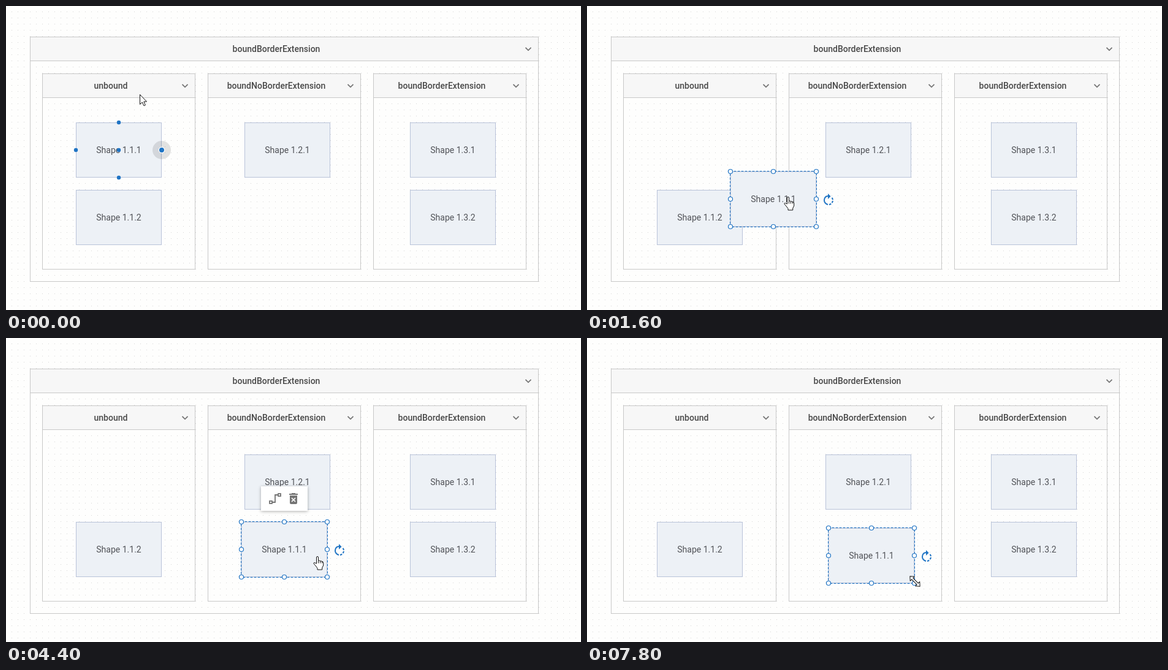
These frames come from a looping animation (938 by 496 pixels, 8000 ms). An HTML page with a canvas:

```html
<!DOCTYPE html>
<html lang="en">
<head>
<meta charset="utf-8">
<title>Container binding</title>
<style>
  html, body { margin: 0; width: 100%; height: 100%; overflow: hidden; background: #fefefd; }
  canvas { display: block; }
</style>
</head>
<body>
<canvas id="stage" width="938" height="496"></canvas>
<script>
const ctx = document.getElementById('stage').getContext('2d');
const W = 938, H = 496, LOOP = 8000, STEP = 200, GRID = 10;
const BLUE = '#1f74c4', GRAY = '#757575', INK = '#111';

// Pointer stops as [time, x, y]; the dragged shape follows from them.
const pointer = [
  [0, 218, 144], [800, 212, 236], [1600, 327, 311], [2400, 392, 436],
  [2800, 424, 337], [3400, 482, 346], [4400, 507, 356], [5200, 523, 373],
  [6800, 573, 303], [7400, 543, 436], [7600, 533, 383], [7800, 535, 397]
];
const drags = [
  { from: 800, to: 3400, grip: [98, 46], maxY: H },
  { from: 5200, to: 7600, grip: [139, 73], maxY: 340 }
];
const columns = ['unbound', 'boundNoBorderExtension', 'boundBorderExtension'];
const fixedShapes = ['1.1.2', '1.2.1', '1.3.1', '1.3.2'];

const clamp = (v, lo, hi) => Math.max(lo, Math.min(hi, v));
const ease = p => p * p * (3 - 2 * p);
const snap = (v, origin) => origin + GRID * Math.round((v - origin) / GRID);
const columnX = i => 59 + 270 * i;

function pointerAt(t) {
  const i = clamp(pointer.findIndex(k => k[0] > t), 0, pointer.length);
  const b = pointer[i] && i ? pointer[i] : pointer[pointer.length - 1];
  const a = i ? pointer[i - 1] : b;
  const p = a === b ? 0 : ease((t - a[0]) / (b[0] - a[0]));
  return [a[1] + (b[1] - a[1]) * p, a[2] + (b[2] - a[2]) * p];
}

function shapeAt(t) {
  const { from, to, grip, maxY } = drags[t < drags[1].from ? 0 : 1];
  const [px, py] = pointerAt(clamp(t, from, to));
  return [snap(px - grip[0], 4), Math.min(snap(py - grip[1], 0), maxY)];
}

function fill(color, x, y, w, h) {
  ctx.fillStyle = color;
  ctx.fillRect(x, y, w, h);
}

function frame(color, x, y, w, h) {
  ctx.strokeStyle = color;
  ctx.lineWidth = 1;
  ctx.strokeRect(x + 0.5, y + 0.5, w - 1, h - 1);
}

function disc(color, x, y, r, edge) {
  ctx.beginPath();
  ctx.arc(x, y, r, 0, Math.PI * 2);
  ctx.fillStyle = color;
  ctx.fill();
  if (!edge) return;
  ctx.strokeStyle = edge;
  ctx.lineWidth = 1.2;
  ctx.stroke();
}

function line(points, color, width) {
  ctx.beginPath();
  points.forEach(p => ctx.lineTo(...p));
  ctx.strokeStyle = color;
  ctx.lineWidth = width;
  ctx.stroke();
}

function label(text, x, y, weight, color) {
  ctx.font = weight + ' 14px Roboto, sans-serif';
  ctx.textAlign = 'center';
  ctx.fillStyle = color;
  ctx.fillText(text, x, y);
}

function drawDots() {
  for (let y = 9; y < H; y += GRID)
    for (let x = 9; x < W; x += GRID) fill('rgba(0,0,0,0.16)', x, y, 1, 1);
}

function drawContainer(title, x, y, w, h) {
  fill('#f7f7f7', x, y, w, 40);
  frame('#c8c8c8', x, y, w, h);
  fill('#c8c8c8', x, y + 39, w, 1);
  label(title, x + (w - 26) / 2, y + 25, 500, '#484848');
  const cx = x + w - 17, cy = y + 20;
  line([[cx - 4.5, cy - 2.2], [cx, cy + 2.3], [cx + 4.5, cy - 2.2]], GRAY, 1.8);
}

function drawShape(id, x, y) {
  fill('#edf1f6', x, y, 140, 90);
  frame('#b9c3d9', x, y, 140, 90);
  label('Shape ' + id, x + 70, y + 50, 400, '#505257');
}

// The last two digits of an id give its column and row.
function drawFixedShape(id) {
  const [, col, row] = id.split('.').map(Number);
  drawShape(id, columnX(col - 1) + (col === 1 ? 55 : 60), 80 + 110 * row);
}

function drawPorts(x, y) {
  for (const [dx, dy] of [[70, 0], [0, 45], [70, 45], [70, 90]])
    disc(BLUE, x + dx, y + dy, 3.2);
  disc('rgba(0,0,0,0.11)', x + 140, y + 45, 15);
  disc(BLUE, x + 140, y + 45, 4.6, '#fff');
}

function drawRotateIcon(x, y) {
  ctx.strokeStyle = ctx.fillStyle = BLUE;
  ctx.lineWidth = 2;
  for (const [a, b] of [[98, 262], [-37, -8], [8, 37], [53, 82]]) {
    ctx.beginPath();
    ctx.arc(x, y, 7, a * Math.PI / 180, b * Math.PI / 180);
    ctx.stroke();
  }
  ctx.fill(new Path2D(`M${x - 1} ${y - 11}l4.5 4.5l-4.5 4.5Z`));
}

function drawSelection(x, y) {
  ctx.setLineDash([4, 2]);
  frame(BLUE, x - 1, y - 1, 142, 92);
  ctx.setLineDash([]);
  for (const dx of [0, 70, 140])
    for (const dy of [0, 45, 90])
      if (dx !== 70 || dy !== 45) disc('#fff', x + dx, y + dy, 3.5, BLUE);
  drawRotateIcon(x + 160, y + 47);
}

function drawToolbar(x, y) {
  ctx.save();
  ctx.translate(x, y);
  ctx.shadowColor = 'rgba(0,0,0,0.32)';
  ctx.shadowBlur = 5;
  ctx.shadowOffsetY = 1;
  fill('#fff', 0, 0, 76, 40);
  ctx.shadowColor = 'transparent';
  // Connector
  line([[18, 26], [23, 26], [23, 14], [28, 14]], GRAY, 1.8);
  ctx.strokeRect(14, 24, 4, 4);
  ctx.strokeRect(28, 12, 4, 4);
  // Trash can
  fill(GRAY, 50, 11, 6, 2);
  fill(GRAY, 46, 12, 14, 2);
  ctx.beginPath();
  ctx.roundRect(47, 15, 12, 14, [0, 0, 2, 2]);
  ctx.fill();
  line([[50, 19], [56, 25]], '#fff', 1.7);
  line([[56, 19], [50, 25]], '#fff', 1.7);
  ctx.restore();
}

const arrow = new Path2D('M.5.5V16.5L4.2 13L7 18.8L9.4 17.7L6.8 12H11.5Z');
const hand = new Path2D('M-.5 12V2Q-.5.5 1 .5T2.5 2V7.5Q4 6 5.5 8Q7.5 6.8 8.3 9' +
  'Q10.7 8.2 10.7 11V15L8.7 19V22H1V19.5L-2.5 15L-5.2 11.8Q-5 9.5-2.5 11Z');
const resize = new Path2D('M-11.5 0L-6-5V-1.5H6V-5L11.5 0L6 5V1.5H-6V5Z');

function drawCursor(kind, x, y) {
  ctx.save();
  ctx.translate(Math.round(x), Math.round(y));
  if (kind === resize) ctx.rotate(Math.PI / 4);
  ctx.lineJoin = 'round';
  ctx.fillStyle = '#fff';
  ctx.fill(kind);
  ctx.strokeStyle = INK;
  ctx.lineWidth = 1;
  ctx.stroke(kind);
  if (kind === hand)
    for (let i = 0; i < 3; i++) line([[2.5 + 3 * i, 8], [2.5 + 3 * i, 11.5]], INK, 1);
  ctx.restore();
}

function draw(t) {
  const [x, y] = shapeAt(t);

  fill('#fefefd', 0, 0, W, H);
  if (t >= 800 && t < 1400) {
    fill('#e9faf2', 39, 50, 830, 400);
    fill('#d8f5e5', columnX(0), 110, 250, 320);
  }
  if (t >= 2800 && t < 3400) fill('#fdedeb', columnX(1), 110, 250, 320);
  drawDots();
  drawContainer(columns[2], 39, 50, 830, 400);
  columns.forEach((title, i) => drawContainer(title, columnX(i), 110, 250, 320));
  fixedShapes.forEach(drawFixedShape);
  drawShape('1.1.1', x, y);

  if (t < 600) drawPorts(x, y);
  else drawSelection(x, y);
  if (t >= 4000 && t < 5200) drawToolbar(x + 32, y - 58);

  const kind = t < 400 ? arrow : t < 7800 ? hand : resize;
  drawCursor(kind, ...pointerAt(t));
}

function tick() {
  const t = performance.now() % LOOP;
  draw(Math.floor(t / STEP) * STEP);
  requestAnimationFrame(tick);
}
tick();
</script>
</body>
</html>
```
